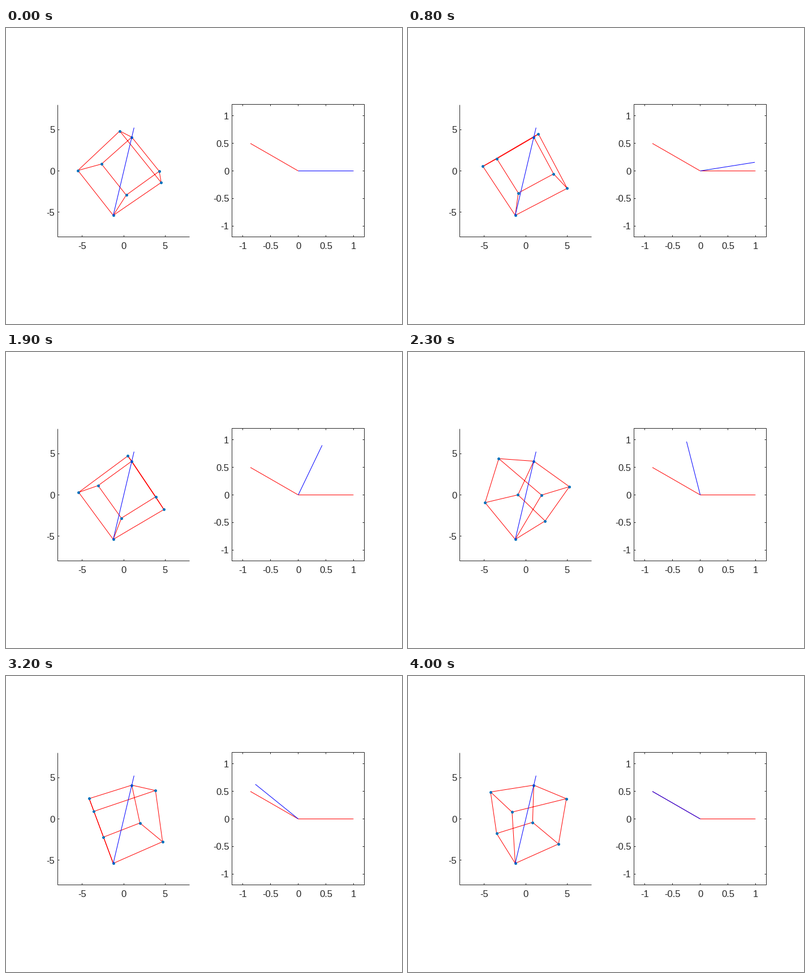
Write a matplotlib script that moves like this. It is 700 px wide and 525 px high and loops after 4100 ms.

```python
from itertools import combinations, product

import numpy as np
import matplotlib.pyplot as plt
from matplotlib.animation import FuncAnimation

W, H, DPI = 700, 525, 100
FRAMES, INTERVAL = 41, 100
PX = 72 / DPI  # one pixel in points

INK = "#262626"
DOT = "#0072bd"
TARGET = np.radians(150)
CAMERA = 15.0
SPAN = 234.3  # side of each plot area

plt.rcParams["font.family"] = "Liberation Sans"

fig = plt.figure(figsize=(W / DPI, H / DPI), dpi=DPI, facecolor="white")
ax = fig.add_axes([0, 0, 1, 1])
ax.set_xlim(0, W)
ax.set_ylim(H, 0)
ax.axis("off")


def line(xs, ys, color, z=2):
    return ax.plot(xs, ys, color=color, lw=PX, zorder=z, snap=False,
                   solid_capstyle="butt", solid_joinstyle="miter")[0]


class Plot:
    """A square plot area with its own data scale, drawn in pixels."""

    def __init__(self, cx, cy, limit):
        self.cx, self.cy = cx, cy
        self.scale = SPAN / (2 * limit)

    def px(self, x, y):
        return self.cx + np.asarray(x) * self.scale, self.cy - np.asarray(y) * self.scale

    def draw_axes(self, left, right, top, bottom, ticks, boxed):
        if boxed:
            line([left, right, right, left, left],
                 [bottom, bottom, top, top, bottom], INK, 1)
            line([left - 0.5, left + 0.5], [bottom, bottom], INK, 1)
        else:
            line([left, left, right], [top, bottom, bottom], INK, 1)
        for t in ticks:
            x, y = self.px(t, t)
            tx, ty = np.floor(x) + 0.5, np.floor(y) + 0.5
            line([tx, tx], [bottom, bottom - 3], INK, 1)
            line([left, left + 3], [ty, ty], INK, 1)
            if boxed:
                line([tx, tx], [top, top + 3], INK, 1)
                line([right, right - 3], [ty, ty], INK, 1)
            label = f"{t:g}"
            style = dict(color=INK, fontsize=12, va="baseline")
            ax.text(x, bottom + 21.5, label, ha="center", **style)
            ax.text(left - 5, y + 6, label, ha="right", **style)


# View from azimuth -30, elevation 30: rows are right, up, towards the viewer
az, el = np.radians([-30, 30])
VIEW = np.array([
    [np.cos(az), np.sin(az), 0],
    [-np.sin(el) * np.sin(az), np.sin(el) * np.cos(az), np.cos(el)],
    [np.cos(el) * np.sin(az), -np.cos(el) * np.cos(az), np.sin(el)],
])
AXIS = np.ones(3) / np.sqrt(3)
CUBE = 3.0 * np.array(list(product((-1, 1), repeat=3)))
EDGES = [(i, j) for i, j in combinations(range(8), 2)
         if np.count_nonzero(CUBE[i] != CUBE[j]) == 1]


def rotate(points, angle):
    """Rodrigues rotation about the cube diagonal."""
    c, s = np.cos(angle), np.sin(angle)
    along = np.outer(points @ AXIS, AXIS)
    return points * c + np.cross(AXIS, points) * s + along * (1 - c)


def project(points):
    x, y, z = VIEW @ np.asarray(points, float).T
    depth = 1 - z / CAMERA
    return x / depth, y / depth


def ease(t):
    k = 3.75
    return 0.5 + 0.5 * np.arctan(k * (2 * t - 1)) / np.arctan(k)


scene = Plot(208.2, 253.5, 8)
dial = Plot(516.6, 253.5, 1.2)
scene.draw_axes(91.5, 324.5, 136.5, 370.5, (-5, 0, 5), False)
dial.draw_axes(399.5, 633.5, 135.5, 370.5, (-1, -0.5, 0, 0.5, 1), True)

edges = line([], [], "red")
dots = ax.plot([], [], "o", color=DOT, ms=5 * PX, mew=0, zorder=3)[0]
line(*scene.px(*project([[-3] * 3, [4] * 3])), "blue", 4)

for a in (0, TARGET):
    line(*dial.px([0, np.cos(a)], [0, np.sin(a)]), "red")
hand = line([], [], "blue", 4)


def update(i):
    angle = TARGET * ease(i / (FRAMES - 1))
    x, y = scene.px(*project(rotate(CUBE, 2 * (angle - TARGET))))
    dots.set_data(x, y)
    edges.set_data(
        np.ravel([(x[a], x[b], np.nan) for a, b in EDGES]),
        np.ravel([(y[a], y[b], np.nan) for a, b in EDGES]))
    hand.set_data(*dial.px([0, np.cos(angle)], [0, np.sin(angle)]))
    return edges, dots, hand


anim = FuncAnimation(fig, update, frames=FRAMES, interval=INTERVAL,
                     repeat=True, repeat_delay=0)
plt.show()
```
